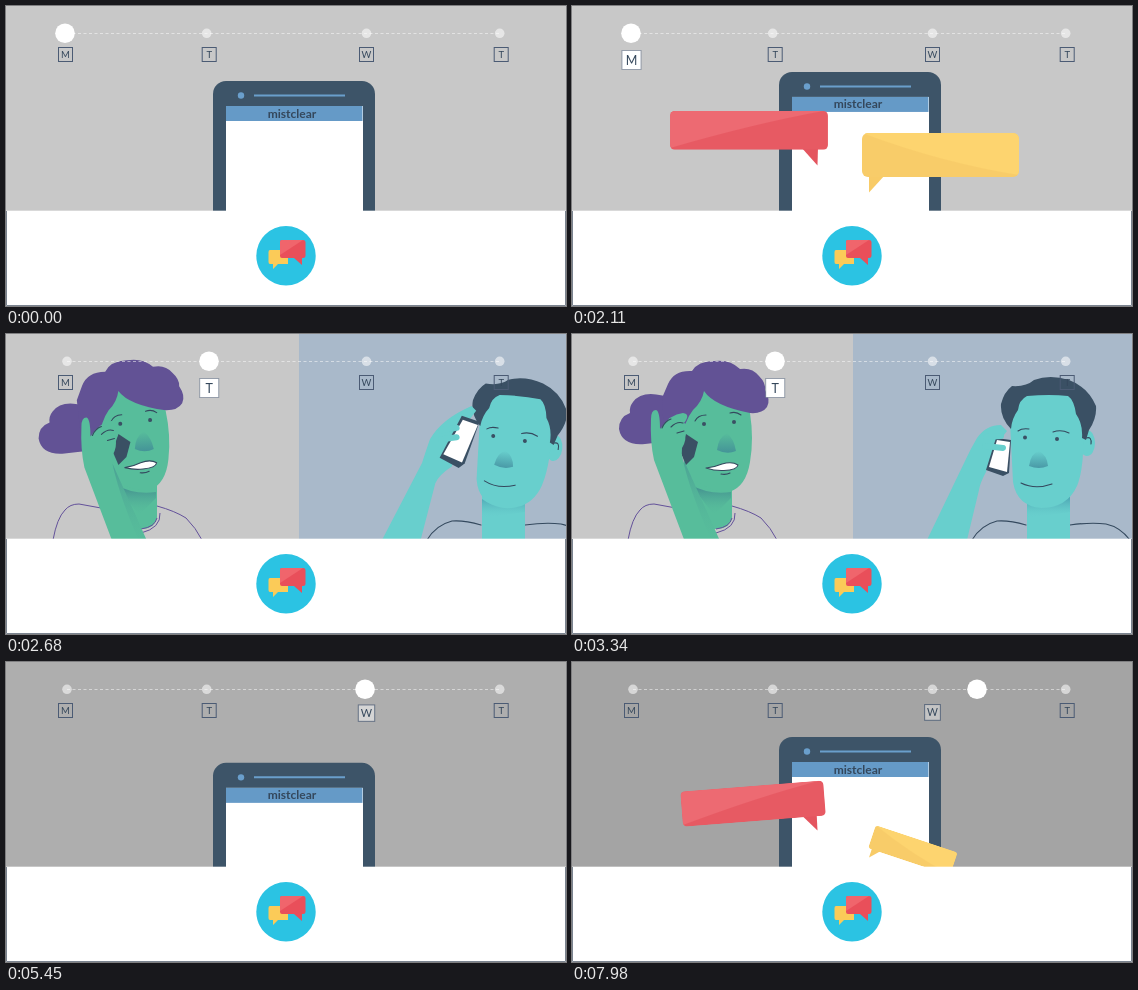
Write an HTML page that moves like this. It is 560x300 px and loops after 8 s.

```html
<!DOCTYPE html>
<html lang="en">
<head>
<meta charset="utf-8">
<title>Week timeline</title>
<style>
html, body { margin: 0; width: 100%; height: 100%; overflow: hidden; }
svg { display: block; width: 100vw; height: 100vh; }
text { font-family: Lato, "Open Sans", sans-serif; text-anchor: middle; fill: #34475b; }
.line { fill: none; stroke: #34495e; stroke-width: 1.1; stroke-linecap: round; stroke-linejoin: round; }
.shirt { fill: none; stroke: #63519a; stroke-width: 1; }
.hair { fill: #625295; }
.wskin { fill: #57bd9b; }
.mskin { fill: #68cfcd; }
.dark { fill: #3a5064; }
</style>
</head>
<body>
<svg viewBox="0 0 560 300" preserveAspectRatio="none">
  <defs>
    <linearGradient id="wshade" x1="0" y1="0" x2="0" y2="1">
      <stop offset="0" stop-color="#39788a" stop-opacity=".75"/>
      <stop offset="1" stop-color="#57bd9b" stop-opacity="0"/>
    </linearGradient>
    <linearGradient id="mshade" x1="0" y1="0" x2="0" y2="1">
      <stop offset="0" stop-color="#3f8fa6" stop-opacity=".75"/>
      <stop offset="1" stop-color="#68cfcd" stop-opacity="0"/>
    </linearGradient>
    <linearGradient id="nose" x1="0" y1="0" x2="0" y2="1">
      <stop offset="0" stop-color="#3c8296" stop-opacity="0"/>
      <stop offset="1" stop-color="#3c8296" stop-opacity=".7"/>
    </linearGradient>
    <clipPath id="redClip"><rect x="90" y="111" width="166.500" height="41" rx="5"/></clipPath>
    <clipPath id="yelClip"><rect x="290" y="136" width="157" height="44" rx="6"/></clipPath>
  </defs>

  <rect id="bg" width="560" height="300"/>

  <g id="phone">
    <rect x="207" y="75" width="162" height="200" rx="13" fill="#3d5468"/>
    <circle cx="235" cy="89.500" r="3.200" fill="#6a9fcc"/>
    <path d="M248 89.500H339" stroke="#6a9fcc" stroke-width="2"/>
    <rect x="220" y="100" width="137" height="175" fill="#fff"/>
    <rect x="220" y="100" width="136.500" height="15" fill="#659ac7"/>
    <text x="286" y="111.500" font-size="12" font-weight="700">mistclear</text>
    <g id="red">
      <path d="M229 150L245.500 168.500L246 150Z" fill="#e4555f"/>
      <g clip-path="url(#redClip)">
        <path d="M90 111H257V152H90Z" fill="#e75a63"/>
        <path d="M90 111H252Q180 124 90 150Z" fill="#ed6a72"/>
      </g>
    </g>
    <g id="yellow">
      <path d="M297 178V195.500L313 178Z" fill="#f8cb67"/>
      <g clip-path="url(#yelClip)">
        <path d="M290 136H447V180H290Z" fill="#f8cc69"/>
        <path d="M290 136H447V178Q370 166 290 136Z" fill="#fdd46f"/>
      </g>
    </g>
  </g>

  <g id="people">
    <rect id="panel" y="0" width="560" height="300" fill="#a9b9ca"/>
    <g id="woman">
      <path class="shirt" d="M56 206Q60 184 68 176Q73 170 82 170L104 174M160 172Q178 177 189 184Q199 194 205 206"/>
      <path id="bun" class="hair" d="M104 66Q72 53 61 68Q57 73 58 79Q47 83 47 95Q50 112 73 110L108 106Z"/>
      <path class="wskin" d="M112 125H160V184Q158 194 146 195H112Z"/>
      <path class="shirt" d="M160 184Q158 193 144 195M163 179Q164 194 144 199"/>
      <g id="whead">
        <path class="hair" d="M90 64L96 50Q102 36 120 37Q126 27 142 27Q158 25 168 35Q180 33 187 42Q194 49 193 56Q199 66 195 73Q190 80 178 79L122 100H92Z"/>
        <path class="wskin" d="M109 106Q113 86 121 76Q130 68 132 57Q142 72 178 79Q182 105 178 128Q174 153 157 158Q139 158 126 148Q109 132 109 106Z"/>
        <path d="M145 116Q146 104 155 99Q162 105 164 117Q155 121 145 116Z" fill="url(#nose)"/>
        <path class="line" d="M123 87Q126 81 134 81M158 79Q164 77 169 81"/>
        <circle class="dark" cx="132" cy="90" r="2"/><circle class="dark" cx="162" cy="88" r="2"/>
        <path class="line" style="fill:#fff" d="M134 134Q143 133 150 130Q160 127 166 131Q165 136 152 136.500Q143 137 134 134Z"/>
        <path class="line" d="M149 140Q154 141 158 139"/>
      </g>
      <path d="M119 151Q137 161 159 158V164L142 181Z" fill="url(#wshade)"/>
      <path id="wcell" class="dark" d="M114 100L126 108L122 123L114 131L108 117Z"/>
      <g id="warm">
        <path class="wskin" d="M79 85Q79 76 84 76Q88 77 88 95Q98 80 111 79Q119 80 112 89Q119 91 113 97Q115 106 110 114Q108 126 118 140L152 216H116L82 126Q78 108 79 85Z"/>
        <path d="M110 122L152 216H144Q118 160 110 122Z" fill="url(#wshade)" opacity=".55"/>
        <path class="line" stroke-width=".8" d="M90 94Q93 87 99 85M99 93Q105 87 111 89M105 99L112 97"/>
      </g>
    </g>
    <g id="man">
      <path class="line" d="M400 206Q409 191 425 187Q437 186 454 191M498 191Q519 188 534 190Q548 193 558 206"/>
      <path class="mskin" d="M455 155H498V206H455Z"/>
      <path d="M455 165Q475 180 498 162V178L455 184Z" fill="url(#mshade)"/>
      <g id="mhead">
        <ellipse class="mskin" cx="515" cy="109" rx="8" ry="13"/>
        <path class="line" stroke-width=".8" d="M514 104Q520 102 519 110"/>
        <path class="mskin" d="M438 88L446 58H498L511 88Q513 133 505 152Q495 174 469 174Q445 172 441 148Z"/>
        <path class="dark" d="M439 95Q428 84 429 70Q432 58 440 52Q454 53 462 46Q478 40 497 46Q516 53 524 72Q525 84 517 96L514 106L510 104Q511 90 504 80Q502 66 496 62Q478 60 455 62Q447 66 446 76Q440 84 439 95Z"/>
        <path d="M457 132Q459 119 467 117Q475 121 476 132Q467 136 457 132Z" fill="url(#nose)"/>
        <path class="line" d="M446 97Q450 94 457 95M481 98Q489 95 497 99M449 149Q463 156 480 150"/>
        <circle class="dark" cx="453" cy="103.500" r="2"/><circle class="dark" cx="485" cy="105" r="2"/>
      </g>
      <path id="arm" class="mskin"/>
      <path id="cell" class="dark"/>
      <path id="screen" fill="#fff"/>
      <path id="fingers" fill="none" stroke="#68cfcd" stroke-width="6" stroke-linecap="round"/>
    </g>
  </g>

  <path d="M61 27.500H494" stroke="#fff" stroke-opacity=".5" stroke-dasharray="3 2.500"/>
  <g id="days"></g>
  <circle id="dot" cy="27.300" r="9.800" fill="#fff"/>

  <rect y="204.700" width="560" height="95.300" fill="#fff"/>
  <path d="M.5 205V299.500H559.500V205" fill="none" stroke="#7b8490"/>
  <circle cx="280" cy="249.800" r="29.700" fill="#2bc3e3"/>
  <path d="M264 244H281Q282 244 282 245V258H272L267 263V258H264Q262.500 258 262.500 256V246Q262.500 244 264 244Z" fill="#fbcb58"/>
  <path d="M276 234H297Q299.500 234 299.500 236V250Q299.500 252 297 252H296V259L288 252H276Q274 252 274 250V236Q274 234 276 234Z" fill="#e94f5a"/>
  <path d="M276 234H297L274 249V236Q274 234 276 234Z" fill="#f0656c"/>
</svg>

<script>
const LOOP = 8000;
const $ = id => document.getElementById(id);
const set = (id, name, value) => $(id).setAttribute(name, value);
const move = (id, x, y = 0, rest = '') => set(id, 'transform', `translate(${x} ${y}) ${rest}`);
const prog = (t, a, b) => Math.min(1, Math.max(0, (t - a) / (b - a)));
const mix = (a, b, p) => a + (b - a) * p;
const inOut = u => u < .5 ? 4 * u ** 3 : 1 - 4 * (1 - u) ** 3;
const backIn = u => u * u * (2.70158 * u - 1.70158);
const backOut = u => 1 - backIn(1 - u);

// blends the numbers of two paths with the same commands
function morph(a, b, p) {
  const n = b.match(/[\d.]+/g);
  let i = 0;
  return a.replace(/[\d.]+/g, v => mix(+v, +n[i++], p).toFixed(2));
}

// [near the ear, held up]
const hand = {
  arm: ['M355 206L393 127Q399 114 405 104Q414 91 429 91L435 97L428 106L418 125L414 138Q408 149 407 156L395 206Z',
        'M355 206L396 130Q400 115 402 106Q415 82 452 63L456 67L440 88L435 110L430 130Q414 137 409 146L393 206Z'],
  cell: ['M424 104L439 106L437 139L431 142L414 136Z', 'M440 71L459 79L438 125L432 130L412 118Z'],
  screen: ['M425 106L438 108L435 138L417 133Z', 'M441 76L457 83L435 124L416 114Z'],
  fingers: ['M414 103L429 102M413 112L431 114', 'M414 93L430 90M415 102L429 98']
};

const days = [['M', 61, 59.5], ['T', 200.7, 203.2], ['W', 360.5, 360.5], ['T', 493.7, 495.2]];
$('days').innerHTML = days.map(([name, dot, x], i) =>
  `<circle cx="${dot}" cy="27.300" r="4.800" fill="#fff" fill-opacity=".55"/>
   <rect id="box${i}" stroke="#4b5b74"/><text id="day${i}" x="${x}">${name}</text>`).join('');

function drawDay(i, g) {
  const x = days[i][2], y = mix(48.5, 54, g), size = mix(14, 19, g), font = mix(9.5, 12.5, g);
  const box = { x: x - size / 2, y: y - size / 2, width: size, height: size,
    fill: `rgba(255,255,255,${g})`, 'stroke-opacity': 1 - .5 * g };
  for (const k in box) set('box' + i, k, box[k]);
  set('day' + i, 'y', y + font * .36);
  set('day' + i, 'font-size', font);
}

// how far the split view is pushed out: 0 in place, 1 away
function away(t) {
  if (t < 2133 || t > 5430) return 1;
  if (t < 3340) return 2 ** (-10 * (t - 2133) / 1207);
  return t < 4310 ? 0 : 2 ** (10 * ((t - 4310) / 1120 - 1));
}

function phoneY(t) {
  return t < 3500 ? 130 * backIn(prog(t, 1840, 2340)) : 130 * (1 - backOut(prog(t, 5330, 5830)));
}

function bubble(id, x, y, s, turn) {
  move(id, x, y, `rotate(${turn}) scale(${Math.max(0, s)}) translate(${-x} ${-y})`);
}

function drawBubbles(t) {
  const leave = prog(t, 7890, 7980);
  let red, yellow, spin = 1;
  if (t < 1840) {
    red = backOut(prog(t, 20, 420));
    yellow = backOut(prog(t, 150, 570));
  } else if (t < 3500) {
    red = 1 - prog(t, 2040, 2230) ** 3;
    yellow = 1 - prog(t, 2110, 2290) ** 3;
    spin = 0;
  } else {
    red = backOut(prog(t, 5480, 5800)) - .14 * leave;
    yellow = backOut(prog(t, 5570, 5930)) - .45 * leave;
  }
  bubble('red', 245.5, 168.5, red, -32 * (1 - red) * spin);
  bubble('yellow', 297, 195.5, yellow, 41 * (1 - yellow) * spin);
}

function drawPeople(t) {
  const d = away(t), push = 279 * d;
  set('people', 'visibility', d < 1 ? 'visible' : 'hidden');
  set('panel', 'x', 281 + push);
  move('woman', -.75 * push);
  move('man', 1.75 * push);

  const pose = 1 - inOut(prog(t, 2400, 3050));
  move('bun', -8 * pose, 14 * pose);
  move('whead', -7 * pose, -2 * pose, `rotate(${-5 * pose} 150 158)`);
  move('warm', 8 * pose, 11 * pose);
  move('wcell', 11 * pose);
  move('mhead', 9 * pose, 0, `rotate(${9 * pose} 470 170)`);
  for (const k in hand) set(k, 'd', morph(hand[k][0], hand[k][1], pose));
}

function draw(t) {
  const grey = mix(mix(200, 170, prog(t, 5150, 5500)), 164, prog(t, 7890, 7980));
  set('bg', 'fill', `rgb(${grey},${grey},${grey})`);

  const py = phoneY(t);
  move('phone', 0, py);
  set('phone', 'visibility', py < 129.9 ? 'visible' : 'hidden');
  drawBubbles(t);
  drawPeople(t);

  const dot = 59 + 144 * inOut(prog(t, 2130, 2483)) + 157 * inOut(prog(t, 4920, 5520)) + 45 * prog(t, 7890, 7980);
  set('dot', 'cx', dot);
  drawDay(0, prog(t, 30, 240) - prog(t, 2120, 2330));
  drawDay(1, prog(t, 2350, 2520) - prog(t, 5060, 5210));
  drawDay(2, prog(t, 5350, 5560) - .65 * prog(t, 7890, 7980));
  drawDay(3, 0);
}

const start = performance.now();
function tick() {
  draw((performance.now() - start) % LOOP);
  requestAnimationFrame(tick);
}
tick();
</script>
</body>
</html>
```
